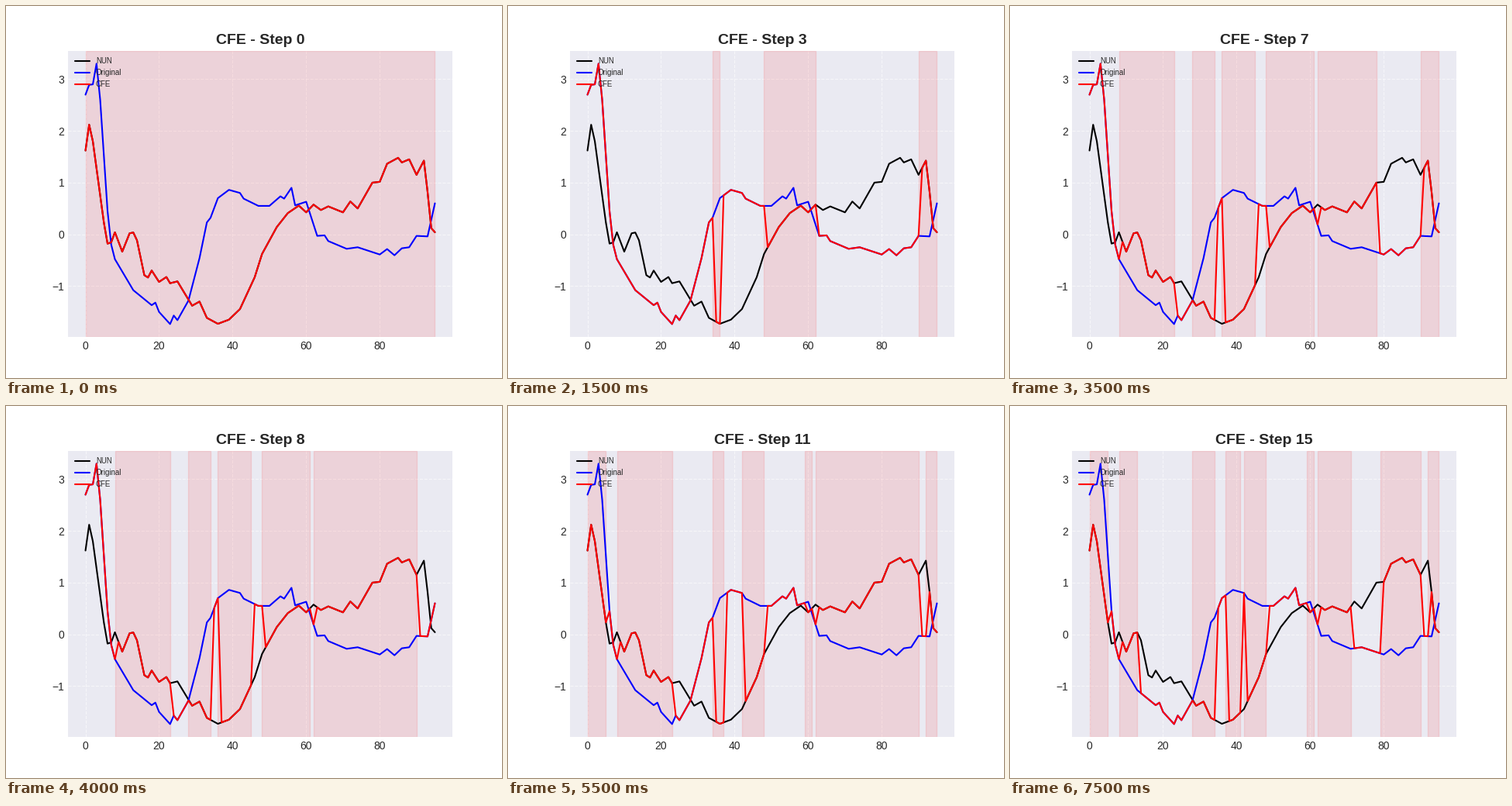
Animation of 640 by 480 pixels, one loop 8 s. Source, as a matplotlib script:

```python
import matplotlib.pyplot as plt
import numpy as np
from matplotlib.animation import FuncAnimation

plt.rcParams.update({
    "font.family": "Liberation Sans",
    "font.size": 10,
    "text.color": ".15",
    "axes.facecolor": "#EAEAF2",
    "axes.linewidth": 0,
    "axes.edgecolor": "white",
    "axes.axisbelow": True,
    "xtick.color": ".15",
    "ytick.color": ".15",
    "xtick.major.size": 0,
    "ytick.major.size": 0,
    "grid.color": "white",
    "lines.solid_capstyle": "round",
    "legend.frameon": False,
})

STEPS = 16
LAST = 95


def series(knots):
    """Sample a broken line at every whole time step."""
    return np.interp(np.arange(LAST + 1), *zip(*knots))


query = series([
    (0, 2.7), (1, 2.89), (2, 2.9), (3, 3.3), (4, 2.6), (6, .45), (7, -.2),
    (8, -.48), (13, -1.08), (18, -1.37), (19, -1.32), (20, -1.5),
    (23, -1.735), (24, -1.57), (25, -1.66), (28, -1.28), (31, -.46),
    (33, .23), (34, .32), (36, .7), (39, .86), (42, .8), (43, .69),
    (47, .55), (50, .55), (53, .735), (54, .69), (56, .9), (57, .56),
    (60, .63), (63, -.03), (65, -.02), (66, -.13), (71, -.28), (74, -.25),
    (80, -.39), (82, -.285), (84, -.405), (86, -.27), (88, -.25),
    (90, -.03), (93, -.04), (95, .6)])

nun = series([
    (0, 1.62), (1, 2.12), (2, 1.8), (5, .23), (6, -.18), (7, -.155),
    (8, .04), (10, -.335), (12, .02), (13, .035), (14, -.115), (16, -.79),
    (17, -.835), (18, -.7), (20, -.92), (22, -.825), (23, -.945),
    (25, -.91), (29, -1.38), (31, -1.3), (33, -1.615), (36, -1.73),
    (39, -1.65), (42, -1.445), (46, -.83), (48, -.38), (52, .14),
    (55, .41), (58, .555), (60, .425), (62, .575), (64, .47), (66, .54),
    (70, .425), (72, .635), (74, .5), (78, 1), (80, 1.015), (82, 1.365),
    (85, 1.48), (86, 1.39), (88, 1.45), (90, 1.15), (92, 1.425), (93, .82),
    (94, .12), (95, .04)])

# (a, b, start, stop): NUN values replace a+1..b while start <= step < stop.
spans = [
    (-1, 95, 0, 1), (34, 36, 1, 4), (48, 62, 1, 4), (90, 95, 1, 8),
    (0, 8, 4, 6), (28, 34, 4, 11), (36, 48, 4, 7), (62, 78, 4, 8),
    (8, 23, 6, 13), (36, 45, 7, 11), (48, 61, 7, 11), (62, 90, 8, 15),
    (0, 5, 9, 10), (92, 95, 9, 16), (-1, 5, 10, 16), (34, 37, 11, 14),
    (42, 48, 11, 16), (59, 61, 11, 16), (8, 28, 13, 14), (8, 13, 14, 16),
    (28, 34, 14, 16), (37, 41, 14, 16), (62, 71, 15, 16), (79, 90, 15, 16)]

fig, ax = plt.subplots(figsize=(6.4, 4.8), dpi=100)


def draw(step):
    ax.clear()
    cfe = query.copy()
    for a, b, start, stop in spans:
        if start <= step < stop:
            cfe[a + 1:b + 1] = nun[a + 1:b + 1]
            ax.axvspan(max(a, 0), b, color="red", alpha=0.1)
    ax.plot(nun, color="black", label="NUN")
    ax.plot(query, color="blue", label="Original")
    ax.plot(cfe, color="red", label="CFE")
    ax.set_title(f"CFE - Step {step}", fontsize=14, fontweight="bold")
    ax.grid(True, linestyle="--", alpha=0.6)
    ax.legend(loc="upper left", fontsize=7)
    ax.set_xlim(-0.05 * LAST, 1.05 * LAST)
    return []


anim = FuncAnimation(fig, draw, frames=STEPS, init_func=lambda: [],
                     interval=500, repeat=True)
plt.show()
```
